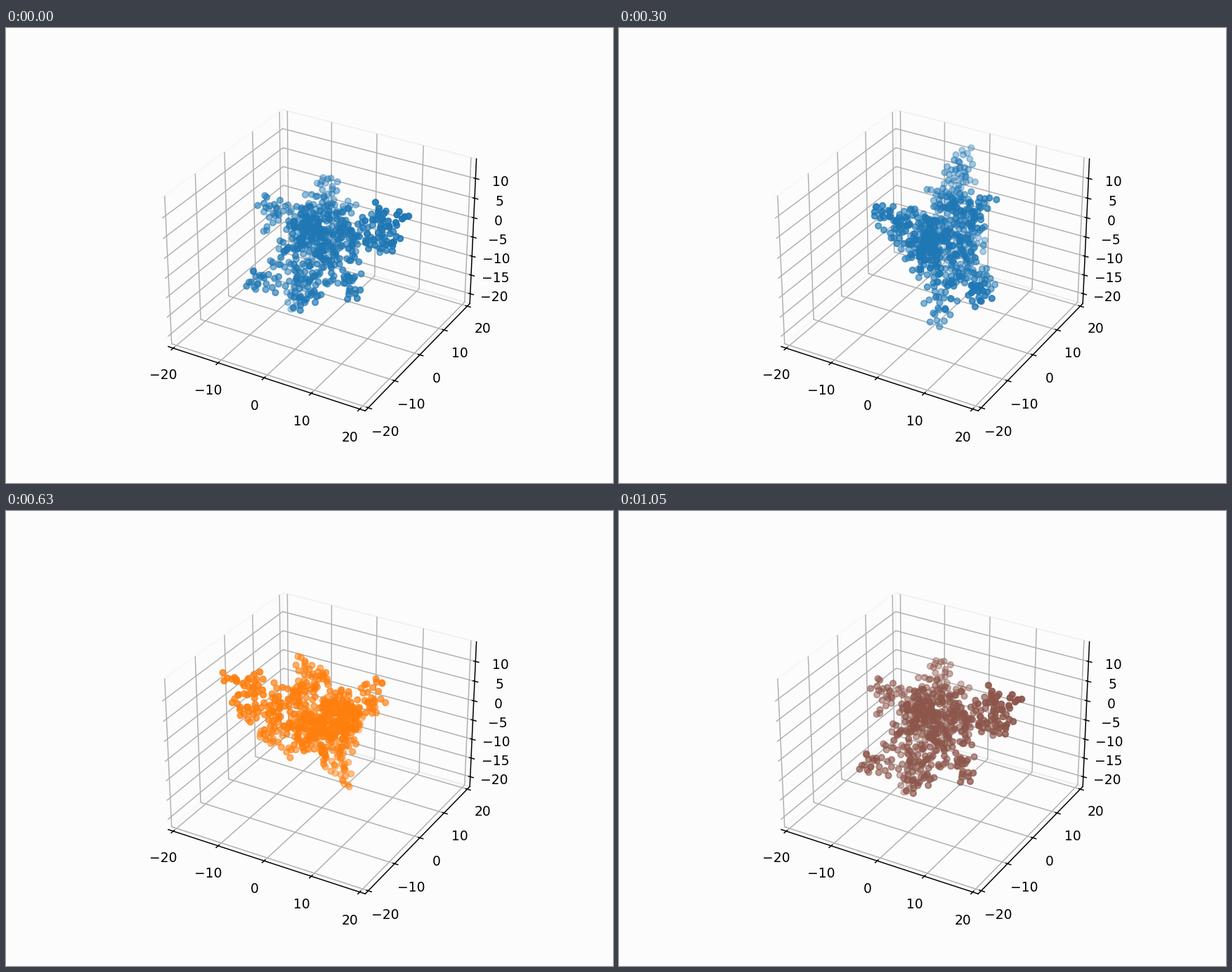
A matplotlib script that plays this animation: 864x648 px, repeating every 1.08 s.

```python
import numpy as np
import matplotlib.pyplot as plt
from matplotlib.animation import FuncAnimation

FRAMES, INTERVAL = 36, 30
BACK = "#fcfcfc"
COUNT, STEP = 560, 1.4

# Ends of the main arms: radius, angle (degrees), height
ARMS = [(18, -4, 12), (16, 0, 4), (16, 236, -8), (12, 190, 7), (11, 112, 8),
        (6, 205, -19), (12, -30, -8), (10, -75, 10), (10, 280, -11)]


def cylinder(r, deg, z):
    a = np.radians(deg)
    return np.array([r * np.cos(a), r * np.sin(a), z])


def make_cluster(seed=11):
    """Grow a tree from the centre towards random points around the arms."""
    rng = np.random.default_rng(seed)
    arms = [cylinder(*arm) for arm in ARMS]
    nodes = np.zeros((1, 3))
    while len(nodes) < COUNT:
        t = rng.random()
        spread = 4.2 - 3.4 * t
        target = t * arms[rng.integers(len(arms))] + rng.normal(0, spread, 3)
        gaps = np.linalg.norm(nodes - target, axis=1)
        i = gaps.argmin()
        if gaps[i] > STEP:
            new = nodes[i] + STEP * (target - nodes[i]) / gaps[i]
            nodes = np.vstack([nodes, new])
    return nodes.T


x, y, z = make_cluster()

fig = plt.figure(figsize=(6.4, 4.8), dpi=135, facecolor=BACK)
ax = fig.add_subplot(projection="3d", facecolor=BACK)
ax.set(xlim=(-21.12, 21.12), ylim=(-21.12, 21.12), zlim=(-22.65, 14.89))
ax.set_xticks(range(-20, 21, 10))
ax.set_yticks(range(-20, 21, 10))
ax.set_zticks(range(-20, 11, 5))
for axis in (ax.xaxis, ax.yaxis, ax.zaxis):
    axis.pane.fill = False


def draw(n):
    for old in list(ax.collections):
        old.remove()
    a = 2 * np.pi * n / (FRAMES - 1)
    c, s = np.cos(a), np.sin(a)
    return [ax.scatter(c * x - s * y, s * x + c * y, z, color=f"C{n % 10}")]


anim = FuncAnimation(fig, draw, frames=FRAMES, interval=INTERVAL,
                     repeat=True, repeat_delay=0, blit=False)
plt.show()
```
